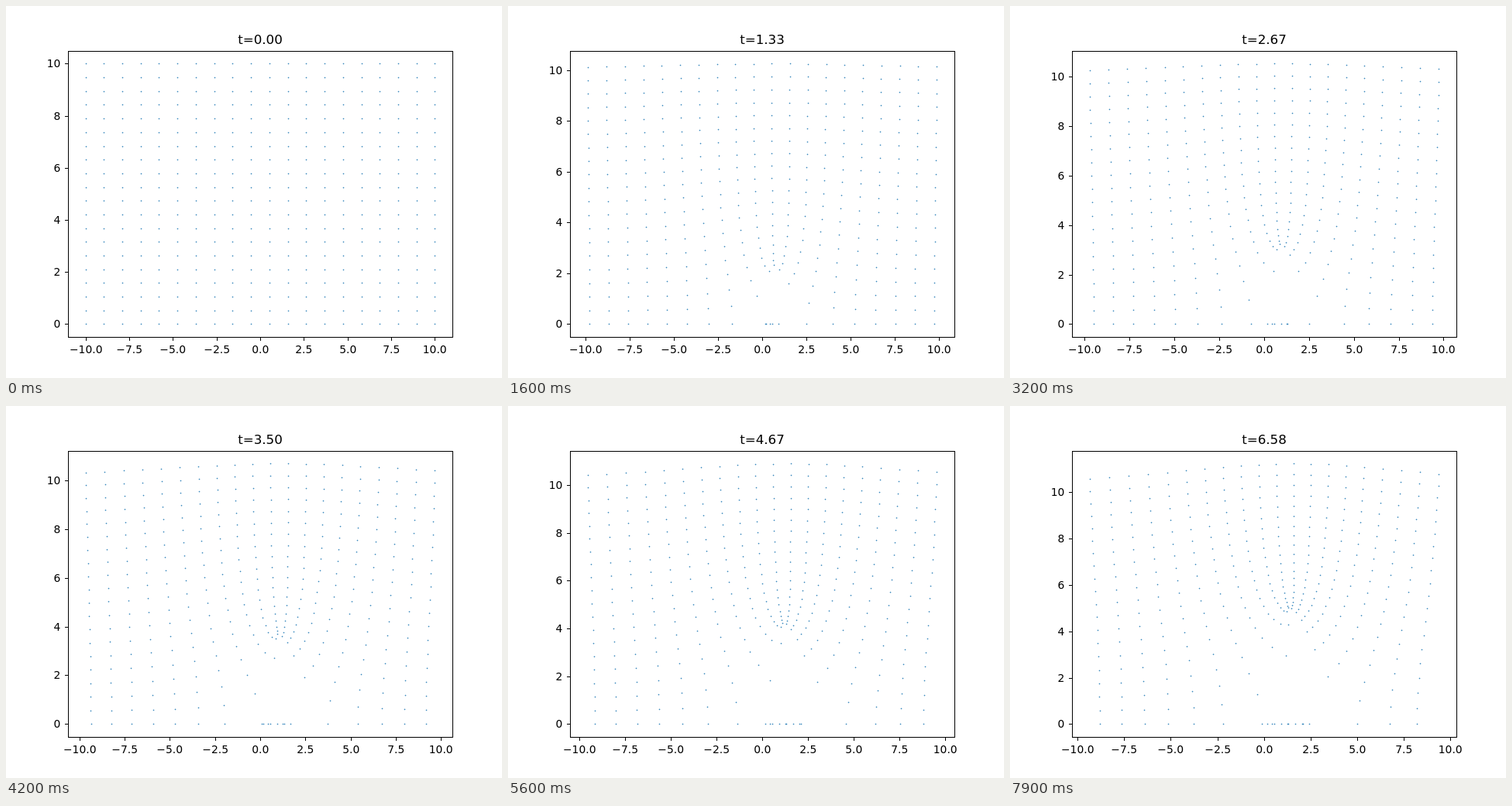
These frames come from a looping animation (640x480 px, 8000 ms). An HTML page with a canvas:

```html
<!DOCTYPE html>
<html lang="en">
<head>
<meta charset="utf-8">
<title>Backward Loewner flow</title>
<style>
  html, body { margin: 0; width: 640px; height: 480px; overflow: hidden; background: #fff; }
  canvas, svg { position: absolute; left: 0; top: 0; }
  text { font: 13.89px "DejaVu Sans", sans-serif; fill: #000; }
  #title { font-size: 16.67px; }
</style>
</head>
<body>
<canvas id="dots" width="640" height="480"></canvas>
<svg id="axes" width="640" height="480" viewBox="0 0 640 480">
  <rect x="80.5" y="58.5" width="496" height="369" fill="none" stroke="#000" shape-rendering="crispEdges"/>
  <text id="title" x="328" y="49" text-anchor="middle"></text>
</svg>
<script>
const STEPS = 80, STEP_MS = 100, GRID = 20, SUB = 24;
const BOX = { left: 102.545, right: 553.455, top: 74.4, bottom: 410.4 };
const EDGE = { left: 80, right: 576, top: 57.6, bottom: 427.2 };

const svg = document.getElementById("axes");
const title = document.getElementById("title");
const ctx = document.getElementById("dots").getContext("2d");

// With s = sqrt(t) the driving point is s itself: dz/ds = -4s / (z - s).
function slope(x, y, s) {
  const dx = x - s, f = -4 * s / (dx * dx + y * y);
  return [f * dx, -f * y];
}

function rk4(x, y, s, h) {
  const a = slope(x, y, s);
  const b = slope(x + a[0] * h / 2, y + a[1] * h / 2, s + h / 2);
  const c = slope(x + b[0] * h / 2, y + b[1] * h / 2, s + h / 2);
  const d = slope(x + c[0] * h, y + c[1] * h, s + h);
  const mix = i => h / 6 * (a[i] + 2 * b[i] + 2 * c[i] + d[i]);
  return [x + mix(0), y + mix(1)];
}

// A real point meets the driving point at a fixed multiple of its start.
const R = Math.sqrt(15);
function meeting(x0) {
  const turn = (x0 < 0 ? 1 : -1) * Math.PI / 2;
  return Math.abs(x0) / 2 * Math.exp((turn + Math.atan(1 / R)) / R);
}

function trace(x0, y0) {
  const path = [[x0, y0]];
  const stop = y0 === 0 ? meeting(x0) : Infinity;
  let x = x0, y = y0;
  for (let k = 1; k < STEPS; k++) {
    const s0 = Math.sqrt((k - 1) / 12), s1 = Math.sqrt(k / 12), h = (s1 - s0) / SUB;
    for (let j = 0; j < SUB; j++) {
      const s = s0 + j * h;
      if (s + h >= stop) { x = stop; break; }
      [x, y] = rk4(x, y, s, h);
    }
    path.push([x, y]);
  }
  return path;
}

const paths = [];
for (let j = 0; j < GRID; j++)
  for (let i = 0; i < GRID; i++)
    paths.push(trace(-10 + 20 * i / (GRID - 1), 10 * j / (GRID - 1)));

function make(tag, attrs, text = "") {
  const el = document.createElementNS("http://www.w3.org/2000/svg", tag);
  for (const key in attrs) el.setAttribute(key, attrs[key]);
  el.textContent = text;
  return svg.appendChild(el);
}

function makeTick(value, horizontal) {
  const g = make("g", {});
  const mark = horizontal
    ? { x: 0, y: 428, width: 1, height: 4 }
    : { x: 76, y: 0, width: 4, height: 1 };
  const label = horizontal
    ? { x: 0.2, y: 448, "text-anchor": "middle" }
    : { x: 70.4, y: 5, "text-anchor": "end" };
  const text = horizontal ? value.toFixed(1).replace("-", "\u2212") : String(value);
  g.append(make("rect", mark), make("text", label, text));
  return { value, g };
}

const xTicks = [], yTicks = [];
for (let v = -10; v <= 10; v += 2.5) xTicks.push(makeTick(v, true));
for (let v = 0; v <= 10; v += 2) yTicks.push(makeTick(v, false));

const scale = (lo, hi, a, b) => v => a + (v - lo) / (hi - lo) * (b - a);

function place(ticks, map, lo, hi, horizontal) {
  for (const { value, g } of ticks) {
    const p = Math.round(map(value));
    g.setAttribute("transform", horizontal ? `translate(${p} 0)` : `translate(0 ${p})`);
    g.setAttribute("visibility", p >= lo && p <= hi ? "visible" : "hidden");
  }
}

function draw(k) {
  const points = paths.map(path => path[k]);
  const xs = points.map(p => p[0]), ys = points.map(p => p[1]);
  const mapX = scale(Math.min(...xs), Math.max(...xs), BOX.left, BOX.right);
  const mapY = scale(Math.min(...ys), Math.max(...ys), BOX.bottom, BOX.top);

  ctx.clearRect(0, 0, 640, 480);
  for (const [x, y] of points) {
    const px = Math.round(mapX(x)), py = Math.round(mapY(y));
    ctx.fillStyle = "rgba(31,119,180,0.25)";
    ctx.fillRect(px - 1, py, 3, 1);
    ctx.fillRect(px, py - 1, 1, 3);
    ctx.fillStyle = "rgba(31,119,180,0.8)";
    ctx.fillRect(px, py, 1, 1);
  }

  place(xTicks, mapX, EDGE.left, EDGE.right, true);
  place(yTicks, mapY, EDGE.top, EDGE.bottom, false);
  title.textContent = "t=" + (k / 12).toFixed(2);
}

let shown = -1;
function tick() {
  const k = Math.floor((performance.now() - start) / STEP_MS) % STEPS;
  if (k !== shown) draw(shown = k);
  requestAnimationFrame(tick);
}
const start = performance.now();
tick();
</script>
</body>
</html>
```
